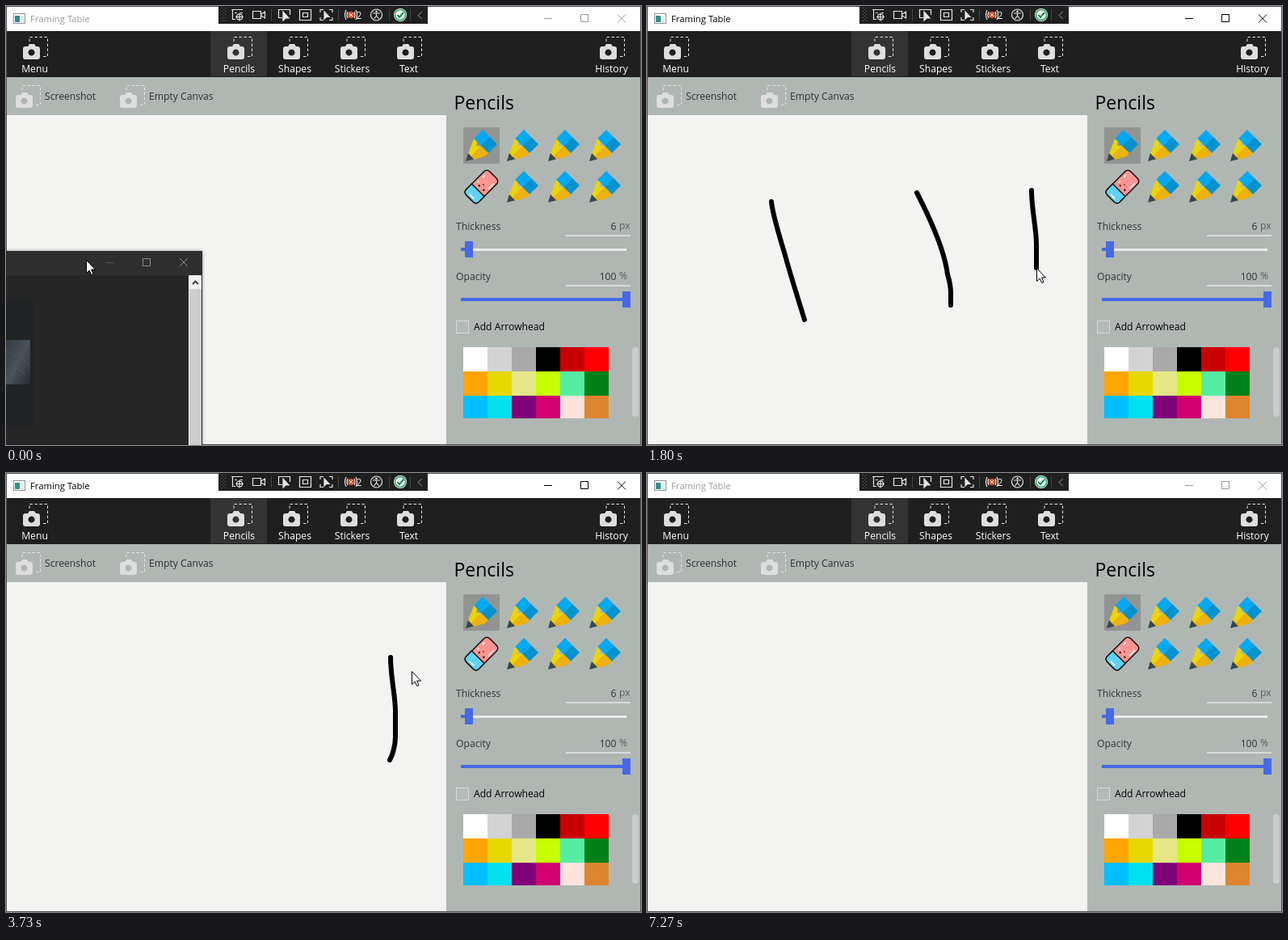
Recreate the animation shown at these times as an HTML page. Size 786 by 543 pixels, loop 7.39 s.

```html
<!DOCTYPE html>
<html lang="en">
<head>
<meta charset="utf-8">
<title>Drawing app</title>
<style>
  html, body { margin: 0; width: 100%; height: 100%; overflow: hidden; }
  svg { display: block; width: 100vw; height: 100vh; }
  text { font: 12.15px "Open Sans", "Noto Sans", sans-serif; white-space: pre; }
  .mid { text-anchor: middle; }
  .end { text-anchor: end; }
  .line { fill: none; stroke: currentColor; }
  #caption { color: #999; }
  #caption.active { color: #000; }
  #caption text { font-size: 11.3px; fill: currentColor; }
  #strokes { fill: none; stroke: #000; stroke-width: 6; stroke-linecap: round; stroke-linejoin: round; }
  #dialog text { font-size: 11px; fill: #3a3a3a; }
</style>
</head>
<body>
<svg viewBox="0 0 786 543">
  <defs>
    <g id="camera">
      <path d="M8 7V1.500H30.500V25.500H23" fill="none" stroke="#e4e4e4" stroke-dasharray="3.500 2.500"/>
      <path fill="#dedede" fill-rule="evenodd" d="M3 13H6L8 10H14L16 13H18Q21 13 21 16V26Q21 29 18 29H3Q0 29 0 26V16Q0 13 3 13ZM10.500 16.500a4 4 0 1 0 .01 0Z"/>
    </g>
    <g id="pencil">
      <path fill="#00a9f4" d="M10 12 21 1 30 10 19 21Z"/>
      <path fill="#0093cf" d="M30 10 39 19 28 30 19 21Z"/>
      <path fill="#ecd500" d="M10 12 14 16 13 21 19 21 6 35 3 31Z"/>
      <path fill="#eeb10d" d="M13 27 19 21 28 30 24 34 10 38 6 35Z"/>
      <path fill="#37474f" d="M3 30 10 37.500 0 40Z"/>
    </g>
    <radialGradient id="blue" cx=".4" cy=".3" r=".8">
      <stop offset="0" stop-color="#7c9fe8"/><stop offset=".5" stop-color="#3f66c8"/><stop offset="1" stop-color="#24459c"/>
    </radialGradient>
    <linearGradient id="rock" x2="1" y2="1">
      <stop offset="0" stop-color="#343b42"/><stop offset=".5" stop-color="#495159"/><stop offset="1" stop-color="#272c33"/>
    </linearGradient>
    <filter id="shadow" x="-10%" y="-10%" width="120%" height="125%">
      <feDropShadow dx="1" dy="3" stdDeviation="4" flood-opacity=".4"/>
    </filter>
    <filter id="rim" x="-5%" y="-5%" width="110%" height="110%">
      <feDropShadow dx="0" dy="0" stdDeviation="2" flood-opacity=".4"/>
    </filter>
  </defs>

  <rect width="786" height="543" fill="#555"/>
  <rect x="1" y="1" width="784" height="30" fill="#fff"/>
  <rect x="1" y="31" width="784" height="57" fill="#1f1f1f"/>
  <rect x="253" y="31" width="70" height="56" fill="#333"/>
  <rect x="1" y="88" width="784" height="454" fill="#b0b7b3"/>
  <rect id="hover" x="130" y="88" width="138" height="47" fill="#c1c7c4"/>
  <rect x="1" y="135" width="544" height="407" fill="#f3f3f2"/>

  <!-- window caption -->
  <rect x="9.500" y="9.500" width="14" height="12" fill="#fff" stroke="#8a9299"/>
  <path fill="#2f8f87" d="M11 12H17V20H11Z"/>
  <path stroke="#c4cacf" d="M18.500 13.500H22M18.500 16.500H22M18.500 19.500H22"/>
  <g id="caption">
    <text x="30" y="20">Framing Table</text>
    <path class="line" d="M666 15.500H676M711.500 10.500H720.500V19.500H711.500ZM757 10.500 767 20.500M767 10.500 757 20.500"/>
  </g>

  <!-- debug toolbar -->
  <path fill="#1f1f1f" d="M263 0H522V22H263Z"/>
  <path d="M267.500 2V20M271.500 2V20M269.500 4V20" stroke="#686868" stroke-dasharray="1 3"/>
  <path d="M328.500 4V18M411.500 4V18M474.500 4V18M500.500 4V18" stroke="#484848"/>
  <g fill="none" stroke="#e6e6e6" stroke-width="1.200">
    <path d="M279 4.500H293M280.500 4V16.500H284M283 8.500H286M290 8.500H293"/>
    <circle cx="289" cy="13.500" r="3.500"/><path d="M289 8.500V18.500M284 13.500H294"/>
    <path d="M305.500 6.500H315.500V15.500H305.500ZM316 10 320.500 7V15L316 12"/>
    <path d="M342 14.500H337.500V4.500H351.500V11"/>
    <path fill="#e6e6e6" d="M343 7V18L346 15H350ZM394 7V16L396.500 13.500H400Z"/>
    <path d="M363.500 4.500H377.500V17.500H363.500ZM367.500 8.500H373.500V13.500H367.500Z"/>
    <path d="M389 8V4.500H393M400 4.500H404V8M404 14V17.500H400M393 17.500H389V14"/>
    <path d="M421 5Q418 11 421 17M433 5Q436 11 433 17M423 7Q421 11 423 15M431 7Q433 11 431 15"/>
    <circle cx="458.500" cy="11" r="7"/><path d="M454 9H463M458.500 9V12L455.500 16M458.500 12 461.500 16"/>
    <path stroke="#666" d="M515 7 510 11.500 515 16"/>
  </g>
  <circle cx="458.500" cy="6.800" r="1.300" fill="#e6e6e6"/>
  <circle cx="427" cy="11" r="4.300" fill="#dc4a2b"/><path d="M425 9 429 13M429 9 425 13" stroke="#fff"/>
  <text x="433.500" y="15.500" fill="#eee">2</text>
  <circle cx="488" cy="11" r="8" fill="#fff"/><circle cx="488" cy="11" r="6.500" fill="#fff" stroke="#27a567" stroke-width="1.500"/>
  <path d="M484.500 11 487 14 492 8" fill="none" stroke="#168b4c" stroke-width="2"/>

  <g id="menu" fill="#fff"></g>
  <use href="#camera" x="12" y="97"/><text x="48" y="116" fill="#2b2f31">Screenshot</text>
  <use href="#camera" x="141" y="97"/><text x="177" y="116" fill="#2b2f31">Empty Canvas</text>

  <!-- side panel -->
  <text x="554.500" y="128" style="font-size:23px">Pencils</text>
  <rect x="566" y="150" width="45" height="45" fill="#929492"/>
  <g id="tools"></g>
  <g transform="translate(588.500 223.500) rotate(-45)" stroke="#111" stroke-width="1.500">
    <rect x="-20.500" y="-11" width="41" height="22" rx="5" fill="#ff9490"/>
    <path fill="#5fd3f7" d="M-6-11H-15.500Q-20.500-11-20.500-6V6Q-20.500 11-15.500 11H-6Z"/>
    <path d="M-17-4V4M4 8H14M0-7H3M9-7H13" stroke="#fff"/>
    <path d="M-1-4V-2M-1 4V6M3 0H4" stroke-width="2"/>
  </g>
  <g fill="#303536">
    <text x="557" y="277">Thickness</text><text class="end" x="755.500" y="277">6</text>
    <text x="557" y="339">Opacity</text><text class="end" x="755.500" y="339">100</text>
  </g>
  <g fill="#565c5a"><text x="759" y="276">px</text><text x="759" y="338">%</text></g>
  <path d="M693 284H773M693 346H773" stroke="#d8dcde" stroke-width="2"/>
  <path d="M563 301.500H768" stroke="#e9ebea" stroke-width="3"/>
  <path d="M563 301H569M563 363H765" stroke="#4669e8" stroke-width="4"/>
  <path fill="#4669e8" d="M568 291H578V311H568ZM763 353H773V373H763Z"/>
  <rect x="557.500" y="389.500" width="15" height="15" fill="#b3bab7" stroke="#d5dade"/>
  <text x="579" y="401">Add Arrowhead</text>
  <g id="palette"></g>
  <rect x="775" y="422" width="8" height="86" rx="4" fill="#c8cccb"/>

  <g id="strokes">
    <path d="M154 242C156 262 166 290 172 312S190 372 195 388"/>
    <path d="M334 231C350 262 368 300 372 332Q376 345 376 355V370"/>
    <path d="M476 228C476 252 482 275 482 295V326C482 338 478 350 475 355"/>
  </g>

  <g id="darkWindow">
    <path filter="url(#rim)" fill="#262626" d="M-9 303H243V552H-9Z"/>
    <path fill="#2e2e2e" d="M0 303H243V333H0Z"/>
    <path fill="#202323" d="M0 363H34V521H0Z"/>
    <path fill="url(#rock)" d="M0 413H30V468H0Z"/>
    <path fill="none" stroke="#5c646b" opacity=".5" d="M0 424 9 434 15 428 28 445M5 468 12 447 24 456"/>
    <path fill="#f0f0f0" d="M226 333H242V543H226Z"/>
    <path fill="#cdcdcd" d="M227 350H242V543H227Z"/>
    <path d="M231 344 234.500 340.500 238 344" fill="none" stroke="#444" stroke-width="2"/>
    <path id="minimise" d="M124 317.500H134"/>
    <path fill="none" stroke="#8c8c8c" d="M169.500 312.500H178.500V321.500H169.500ZM215 312 225 322M225 312 215 322"/>
  </g>

  <g id="dialog">
    <rect x="52.500" y="346.500" width="310" height="150" fill="#fff" stroke="#858585" filter="url(#shadow)"/>
    <path fill="#f0f0f0" d="M53 454H362V496H53Z"/>
    <text x="60.500" y="365" style="font-size:11.200px">Clear Canvas</text>
    <path id="dialogClose" d="M342 356 352 366M352 356 342 366" stroke="#c4c4c4"/>
    <circle cx="89.500" cy="415" r="15" fill="url(#blue)" stroke="#c4cad6" stroke-width="2"/>
    <text class="mid" x="89.500" y="423.500" style="font:bold 24px 'Noto Sans',sans-serif;fill:#fff">?</text>
    <text x="114" y="420">Are you sure you want to clear the canvas?</text>
    <path fill="#f0f0f0" stroke="#6b6b6b" d="M189.500 463.500H263.500V486.500H189.500ZM272.500 463.500H347.500V486.500H272.500Z"/>
    <path fill="none" stroke="#fff" d="M273.500 485V464.500H346"/>
    <path fill="none" stroke="#777" d="M190.500 464.500H262.500V485.500H190.500ZM346.500 465V485.500H274"/>
    <text class="mid" x="226" y="479">Ja</text><text class="mid" x="309.500" y="479">Nee</text>
  </g>

  <rect x=".5" y=".5" width="785" height="542" fill="none" stroke="#555" stroke-dasharray="0 263 259 2000" opacity="0"/>
  <path id="cursor" fill="#fff" stroke="#000" d="M.5.500V16.500L4.200 13 6.700 18.500 9 17.500 6.600 12H11.500Z"/>
</svg>

<script>
const LOOP = 7390, FPS = 15;
const el = id => document.getElementById(id);
const clamp = v => Math.max(0, Math.min(1, v));
const between = (t, from, to) => t >= from && t < to;
const show = (node, visible) => node.setAttribute('visibility', visible ? 'visible' : 'hidden');

const menu = { Menu: 35.5, Pencils: 288.5, Shapes: 357.5, Stickers: 428.5, Text: 498.5, History: 749.5 };
el('menu').innerHTML = Object.entries(menu).map(([label, x]) =>
  `<use href="#camera" x="${x - 14.5}" y="37"/><text class="mid" x="${x}" y="82">${label}</text>`).join('');

el('tools').innerHTML = [0, 1, 2, 3, 5, 6, 7].map(i =>
  `<use href="#pencil" x="${569 + i % 4 * 51}" y="${152 + (i >> 2) * 51}"/>`).join('');

const colours = ('#fff #d3d3d3 #a9a9a9 #000 #c80000 #f00 #ffa500 #e6d800 #e5e786 #c8ff00 #55eda2 #008019 ' +
  '#00bfff #00e1f0 #800078 #d2006e #ffe4dc #de852f').split(' ');
el('palette').innerHTML = colours.map((c, i) =>
  `<rect x="${566 + i % 6 * 30}" y="${422 + Math.floor(i / 6) * 30}" width="30" height="${i < 12 ? 30 : 28}" fill="${c}"/>`).join('');

// start and end of drawing, then the moment of erasure
const strokeTimes = [[733, 1000, 2990], [1200, 1430, 2990], [1600, 1867, 4990]];
const strokes = [...el('strokes').children].map((path, i) => {
  const [start, end, erased] = strokeTimes[i];
  return { path, start, end, erased, length: path.getTotalLength() };
});

// time, x, y
const cursorKeys = [
  [0, 99, 314], [67, 88, 317], [133, 79, 318], [600, 79, 318], [733, 154, 242],
  [1000, 195, 388], [1200, 334, 231], [1430, 376, 370], [1467, 385, 352], [1600, 476, 228],
  [1867, 475, 355], [2133, 200, 130], [2200, 185, 127], [2467, 185, 127], [2667, 225, 455],
  [2733, 234, 474], [3067, 234, 474], [3533, 505, 252], [3600, 506, 250], [3733, 502, 245],
  [3867, 529, 300], [4000, 480, 364], [4133, 402, 300], [4267, 430, 220], [4400, 480, 193],
  [4467, 480, 200], [4600, 462, 233], [4733, 454, 190], [4933, 454, 190], [5067, 453, 188],
  [5600, 453, 188], [5667, 451, 188], [5800, 390, 220], [5933, 250, 190], [6067, 140, 110], [6200, 105, 30]
];

function cursorAt(t) {
  const stroke = strokes.find(s => between(t, s.start, s.end));
  if (stroke) return stroke.path.getPointAtLength(stroke.length * (t - stroke.start) / (stroke.end - stroke.start));
  const next = cursorKeys.findIndex(k => k[0] > t);
  const [t1, x1, y1] = cursorKeys.at(next < 0 ? -1 : next);
  if (next < 0) return { x: x1, y: y1 };
  const [t0, x0, y0] = cursorKeys[next - 1];
  const p = (t - t0) / (t1 - t0);
  return { x: x0 + (x1 - x0) * p, y: y0 + (y1 - y0) * p };
}

function zoom(node, x, y, scale, opacity) {
  node.setAttribute('transform', `translate(${x} ${y}) scale(${scale}) translate(${-x} ${-y})`);
  node.setAttribute('opacity', opacity);
}

function draw(t) {
  el('caption').classList.toggle('active', between(t, 730, 2260) || between(t, 2990, 7260));
  show(el('hover'), between(t, 2120, 2260));

  show(el('darkWindow'), t < 460);
  zoom(el('darkWindow'), 60, 430, t < 395 ? 1 : .97, t < 395 ? 1 : .45);
  el('minimise').setAttribute('stroke', t < 60 ? '#555' : '#8c8c8c');

  for (const { path, start, end, erased, length } of strokes) {
    show(path, between(t, start, erased));
    path.setAttribute('stroke-dasharray', `${length * clamp((t - start) / (end - start)) + .01} 999`);
  }

  const open = t < 2990 ? clamp((t - 2200) / 230) : clamp(1 - (t - 3000) / 133);
  show(el('dialog'), open > 0);
  zoom(el('dialog'), 207.5, 421, .96 + .04 * open, open);
  show(el('dialogClose'), between(t, 2260, 2990));

  const { x, y } = cursorAt(t);
  show(el('cursor'), t < 7260);
  el('cursor').setAttribute('transform', `translate(${Math.round(x)} ${Math.round(y)})`);
}

const began = performance.now();
function tick() {
  const t = (performance.now() - began) % LOOP;
  draw(Math.floor((t + 4) * FPS / 1000) * 1000 / FPS);
  requestAnimationFrame(tick);
}
tick();
</script>
</body>
</html>
```
